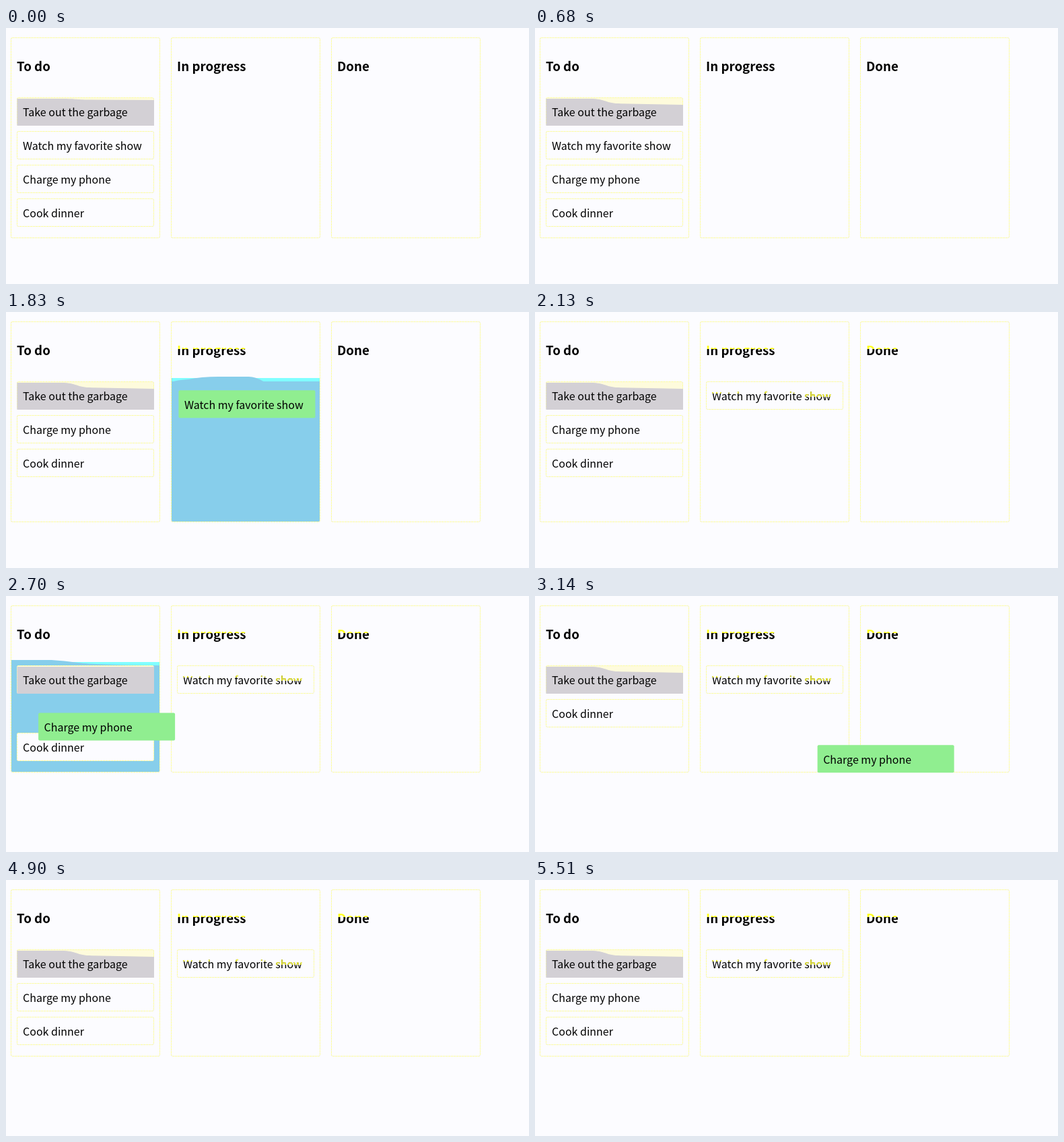
Recreate the animation shown at these times as an HTML page. Size 777 px wide and 380 px high, loop 5580 ms.

```html
<!DOCTYPE html>
<html lang="en">
<head>
<meta charset="utf-8">
<title>Task board</title>
<style>
  html, body { margin: 0; width: 100%; height: 100%; overflow: hidden; background: #fcfcff; }
  svg { display: block; }
  text { font: 16px "Noto Sans CJK JP", "Noto Sans CJK SC", "Noto Sans CJK", sans-serif; fill: #000; }
  .title { font-size: 18.72px; font-weight: 700; }
  .edge { fill: none; stroke: #ececf6; }
  .dash { fill: none; stroke: #ffff9c; stroke-dasharray: 3 1; }
</style>
</head>
<body>
<svg id="stage" width="777" height="380" viewBox="0 0 777 380">
  <defs>
    <linearGradient id="split" gradientUnits="userSpaceOnUse" x1="0" y1="55" x2="0" y2="56">
      <stop offset="0.5" stop-color="#ffff20"/>
      <stop offset="0.5" stop-color="#000"/>
    </linearGradient>
    <clipPath id="worn"><path d="M8 14H188V23H146V18H8z"/></clipPath>
  </defs>
</svg>
<script>
const LOOP = 5580;
const PALE = '#fcfcff', GREEN = '#90ee90', BLUE = '#87ceeb';
const stage = document.getElementById('stage');

function add(parent, tag, attrs, text) {
  const el = document.createElementNS('http://www.w3.org/2000/svg', tag);
  for (const k in attrs) el.setAttribute(k, attrs[k]);
  if (text) el.textContent = text;
  return parent.appendChild(el);
}
const set = (el, k, v) => el.setAttribute(k, v);
const show = (el, on) => set(el, 'visibility', on ? 'visible' : 'hidden');
const clamp = v => Math.max(0, Math.min(1, v));
const mix = (a, b, k) => a + (b - a) * k;
const cubic = (a, b, c, d, s) =>
  a * (1 - s) ** 3 + 3 * b * s * (1 - s) ** 2 + 3 * c * s * s * (1 - s) + d * s ** 3;

function ease(x1, y1, x2, y2) {
  return x => {
    let lo = 0, hi = 1;
    for (let i = 0; i < 24; i++) {
      const mid = (lo + hi) / 2;
      if (cubic(0, x1, x2, 1, mid) < x) lo = mid; else hi = mid;
    }
    return cubic(0, y1, y2, 1, (lo + hi) / 2);
  };
}
const slide = ease(0.2, 0, 0, 1);
const settle = ease(0.2, 1, 0.1, 1);
const shift = (t, start) => slide(clamp((t - start) / 200));

function makeColumn(title, i) {
  const x = 7.5 + 238 * i;
  const list = add(stage, 'g', {});
  const fill = add(list, 'rect', { x: x + 0.5, y: 98, width: 220, fill: BLUE });
  add(list, 'path', { d: `M${x + 1} 98h220v5H${x + 1}z`, fill: '#80ffff' });
  add(list, 'path', {
    d: i ? `M${x + 3} 103q8-2 22-3q20-4 45-4h45q10 0 22 7z`
         : `M${x} 95h60q18 1 40 4t121 4H${x}z`,
    fill: BLUE
  });
  const edges = ['edge', 'dash'].map(c => add(stage, 'rect', { class: c, x, y: 14.5, width: 221, rx: 2 }));
  const head = add(stage, 'text', { class: 'title', x: x + 8.5, y: 64 }, title);
  return { list, fill, edges, head, x };
}

function makeCard(label) {
  const g = add(stage, 'g', {});
  const box = { x: 0.5, y: 0.5, width: 203, height: 41, rx: 2 };
  const back = add(g, 'rect', { ...box, fill: PALE });
  const edges = ['edge', 'dash'].map(c => add(g, 'rect', { ...box, class: c }));
  const text = add(g, 'text', { x: 9, y: 28 }, label);
  return { g, back, edges, text };
}

const columns = ['To do', 'In progress', 'Done'].map(makeColumn);
const [take, cook, charge, watch] =
  ['Take out the garbage', 'Cook dinner', 'Charge my phone', 'Watch my favorite show'].map(makeCard);

set(take.back, 'fill', '#fefbdc');
const shade = add(take.g, 'path', { fill: '#d3d0d5' });
take.g.insertBefore(shade, take.text);
const worn = add(watch.g, 'text', { x: 9, y: 28, 'clip-path': 'url(#worn)', style: 'fill:#ffff20' },
  'Watch my favorite show');

// Each drag follows an arc: x runs evenly with the hand, y bends through two handles.
const watchDrag = {
  lift: 1050, rest: 1420, hand: ease(0.33, 0.3, 0.67, 0.75),
  x: [16, 281], y: [153, 138, 86, 279], drop: 1723, time: 357, to: [254, 103]
};
const chargeDrag = {
  lift: 2600, rest: 3520, hand: ease(0.28, 0.03, 0.36, 1),
  x: [16, 505], y: [153, 258, 337, 142], drop: 3840, time: 402, to: [16, 153]
};

function dragged(d, t) {
  const u = d.hand(clamp((t - d.lift) / (d.rest - d.lift)));
  const x = mix(...d.x, u), y = cubic(...d.y, u);
  const k = settle(clamp((t - d.drop) / d.time));
  return {
    x: mix(x, d.to[0], k), y: mix(y, d.to[1], k),
    held: t >= d.lift && t < d.drop + d.time,
    center: x + 102
  };
}

function place(card, x, y, held) {
  set(card.g, 'transform', `translate(${x.toFixed(2)} ${y.toFixed(2)})`);
  if (card === take) return;
  set(card.back, 'fill', held ? GREEN : PALE);
  card.edges.forEach(e => show(e, !held));
}

let front = watch;
function render(t) {
  const w = dragged(watchDrag, t), c = dragged(chargeDrag, t);
  const bottom = 311.5 - 50 * shift(t, 2155);
  const active = w.held ? w : c.held ? c : null;
  const over = active
    ? columns.findIndex(col => active.center > col.x && active.center < col.x + 221) : -1;

  columns.forEach((col, i) => {
    show(col.list, i === over && i < 2);
    set(col.fill, 'height', bottom - 98);
    col.edges.forEach(e => set(e, 'height', bottom - 14.5));
  });
  columns[1].head.style.fill = t > 1196 ? 'url(#split)' : '#000';
  columns[2].head.style.fill = t > 2080 ? 'url(#split)' : '#000';

  const up = 50 * shift(t, 1196);
  const gap = 50 * (shift(t, 2730) - shift(t, 3840));
  place(take, 16, 103);
  place(cook, 16, 253 - up - gap);
  if (t < 2600) place(charge, 16, 203 - up);
  else place(charge, c.x, c.y, c.held);
  place(watch, w.x, w.y, w.held);
  show(worn, t > 2080);

  const sag = over === 0 ? 0 : t < 610 ? 2 : 9;
  set(shade, 'd', `M0.5 2H66C90 2 88 ${2 + sag * 0.8} 112 ${2 + sag * 0.8}L204 ${2 + sag}V42H0.5Z`);

  const top = t < 2400 ? watch : charge;
  if (top !== front) stage.appendChild((front = top).g);
}

const start = performance.now();
function tick() {
  render((performance.now() - start) % LOOP);
  requestAnimationFrame(tick);
}
tick();
</script>
</body>
</html>
```
